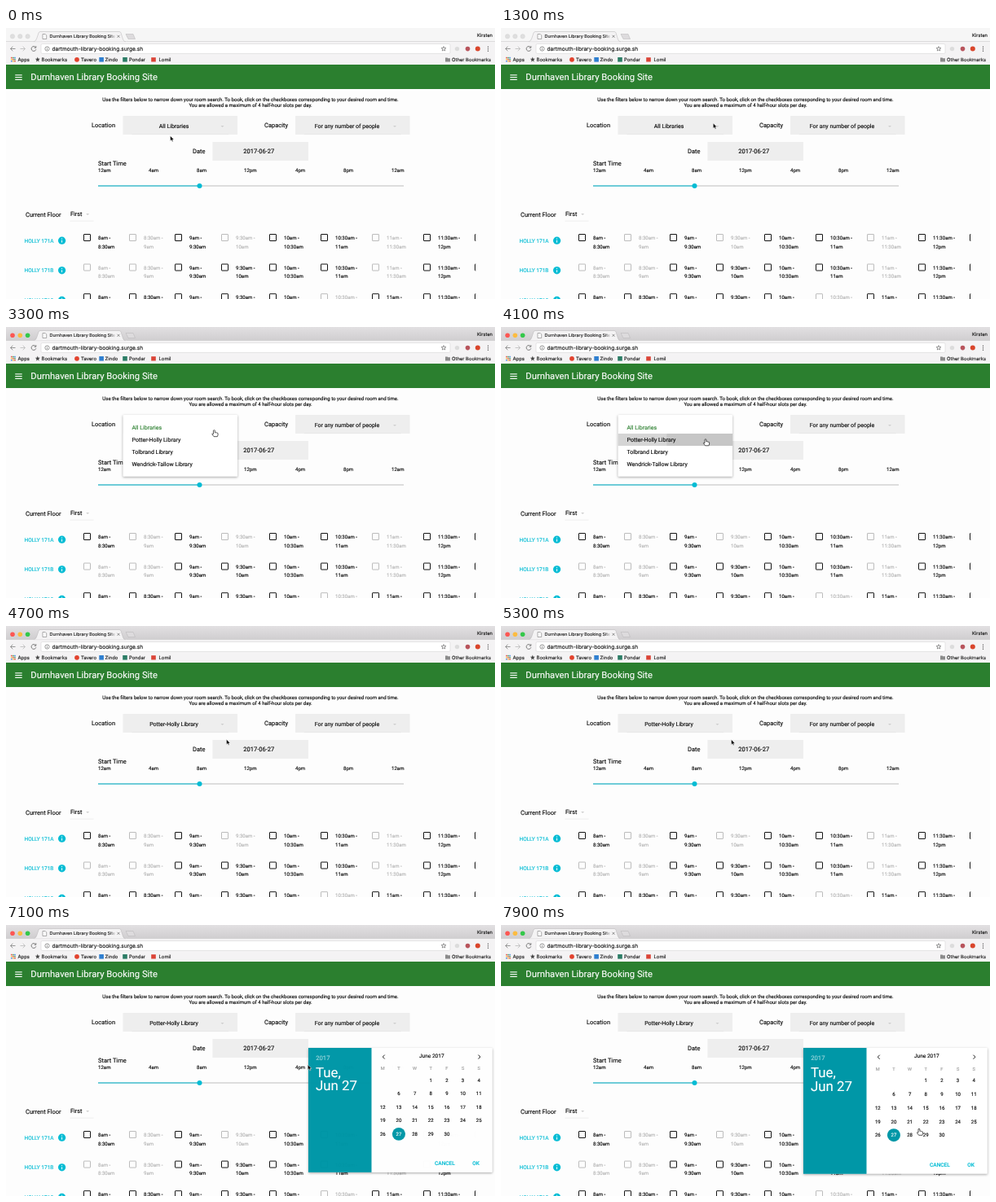
An HTML page for the animation above (8 s loop, 600x333 px).

```html
<!DOCTYPE html>
<html lang="en">
<head>
<meta charset="utf-8">
<title>Library booking</title>
<style>
  html, body { margin: 0; width: 100%; height: 100%; overflow: hidden; background: #fdfdfd; }
  svg { display: block; width: 600px; height: 333px; }
  text {
    font-family: Roboto, sans-serif; color: #080808; fill: currentColor;
    stroke: currentColor; stroke-width: .14px; text-rendering: geometricPrecision; white-space: pre;
  }
  .ui text { font-family: Inter, sans-serif; color: #1a1a1a; }
  .shadow { filter: drop-shadow(0 1px 1.6px rgba(0, 0, 0, .34)); }
</style>
</head>
<body>
<svg id="stage" viewBox="0 0 600 333" xmlns="http://www.w3.org/2000/svg">
  <defs>
    <linearGradient id="bar" x2="0" y2="1"><stop stop-color="#e2e0e2"/><stop offset="1" stop-color="#cfcdcf"/></linearGradient>
    <linearGradient id="fade"><stop stop-color="#f4f3f4" stop-opacity="0"/><stop offset="1" stop-color="#f4f3f4"/></linearGradient>
    <clipPath id="tabClip"><rect x="53" y="4" width="81" height="13"/></clipPath>
    <clipPath id="gridClip"><rect y="240" width="576.3" height="93"/></clipPath>
    <clipPath id="rowClip"><rect x="143.5" y="131" width="140.5" height="15"/></clipPath>
  </defs>
  <g id="page"></g>
  <g id="chrome" class="ui"></g>
  <g id="menu"></g>
  <g id="picker"></g>
  <g id="cursor" stroke-linejoin="round">
    <path id="arrow" d="M0 0V6.4L1.5 5.1L2.5 7.3L3.6 6.8L2.7 4.7H4.6Z" fill="#000" stroke="#fff" stroke-width=".5"/>
    <path id="hand" d="M-1 .5Q0-.6.9.5V3.1Q1.7 2.6 2.2 3.2Q3 2.8 3.5 3.5Q4.5 3.2 4.6 4.3V6.2L3.9 8H-.4L-2.6 5Q-2.5 3.9-1 4.8Z" fill="#fff" stroke="#222" stroke-width=".75"/>
  </g>
</svg>
<script>
const NS = 'http://www.w3.org/2000/svg';
const $ = id => document.getElementById(id);
const CYAN = '#00bcd4', TEAL = '#0097a7', GREEN = '#2b7f2f', TOOLBAR = '#f4f3f4';

function add(parent, tag, attrs, content) {
  const el = document.createElementNS(NS, tag);
  for (const k in attrs) el.setAttribute(k, attrs[k]);
  if (content !== undefined) el.textContent = content;
  return parent.appendChild(el);
}
const rect = (g, x, y, width, height, fill, more) => add(g, 'rect', { x, y, width, height, fill, ...more });
const disc = (g, cx, cy, r, fill, more) => add(g, 'circle', { cx, cy, r, fill, ...more });
const line = (g, d, stroke, w = 1, more) => add(g, 'path', { d, stroke, 'stroke-width': w, fill: 'none', ...more });
const shape = (g, d, fill) => add(g, 'path', { d, fill });
const text = (g, x, y, size, str, color, more) =>
  add(g, 'text', { x, y, 'font-size': size, ...(color && { style: `color:${color}` }), ...more }, str);
const MID = { 'text-anchor': 'middle' };

function star(g, cx, cy, r, fill, stroke) {
  const pts = Array.from({ length: 10 }, (_, i) => {
    const a = i * Math.PI / 5, q = i % 2 ? r * .42 : r;
    return [cx + q * Math.sin(a), cy - q * Math.cos(a)].join();
  });
  add(g, 'polygon', { points: pts.join(' '), fill, stroke, 'stroke-width': .6 });
}

function buildChrome() {
  const g = $('chrome');
  rect(g, 0, 0, 600, 17, 'url(#bar)');
  ['#fc5753', '#fdbc40', '#34c84a'].forEach((c, i) => disc(g, 8 + 9.3 * i, 10.3, 2.8, c));
  const idle = add(g, 'g', { id: 'idle' });
  rect(idle, 0, 0, 600, 17, '#f6f6f6');
  for (let i = 0; i < 3; i++) disc(idle, 8 + 9.3 * i, 10.3, 2.7, '#dedede', { stroke: '#d2d2d2', 'stroke-width': .4 });

  rect(g, 0, 16.5, 600, 28.5, TOOLBAR);
  line(g, 'M0 16.5H600', '#c2c0c2', .5);
  add(g, 'path', { d: 'M34 17Q37 16 38 12L40 6Q40.6 4.5 42 4.5H139Q140.5 4.5 141 6L143.5 14Q144.5 17 147 17Z',
    fill: TOOLBAR, stroke: '#b4b2b4', 'stroke-width': .5 });
  rect(g, 34, 16.8, 114, 1, TOOLBAR);
  add(g, 'path', { d: 'M45 7.5H48.2L49.7 9V13.5H45Z', fill: '#fff', stroke: '#777', 'stroke-width': .6 });
  text(g, 53.6, 12.4, 5.4, 'Durnhaven Library Booking Site', null, { 'clip-path': 'url(#tabClip)' });
  rect(g, 127, 5, 7.5, 11, 'url(#fade)');
  line(g, 'M136.5 8.8L139.5 11.8M139.5 8.8L136.5 11.8', '#666', .7);
  add(g, 'path', { d: 'M147 7.5H156L158.5 13.5H150Z', fill: '#dddbdd', stroke: '#b4b2b4', 'stroke-width': .5 });
  text(g, 597, 11, 5.75, 'Kirsten', null, { 'text-anchor': 'end' });

  line(g, 'M11.5 25.5H5.5M8.3 22.7L5.5 25.5L8.3 28.3', '#8c8c8c', .9);
  line(g, 'M17.5 25.5H23.5M20.7 22.7L23.5 25.5L20.7 28.3', '#c0c0c0', .9);
  line(g, 'M36.3 23.7A2.9 2.9 0 1 0 36.8 26.3M36.8 22.2V24.3H34.7', '#707070', .9);
  rect(g, 43, 19.5, 502, 12, '#fff', { rx: 1.5, stroke: '#d0ced0', 'stroke-width': .5 });
  disc(g, 50.5, 25.5, 2.6, 'none', { stroke: '#555', 'stroke-width': .6 });
  line(g, 'M50.5 25.2V27M50.5 23.8V24.5', '#555', .6);
  text(g, 56.5, 27.7, 6.6, 'dartmouth-library-booking.surge.sh');
  star(g, 537, 25.6, 3, 'none', '#555');
  disc(g, 553.5, 25.6, 2.7, '#dcdcdc');
  disc(g, 566.5, 25.6, 2.8, '#b8545c');
  disc(g, 578.8, 25.6, 3, '#d9452b');
  for (const y of [23.2, 25.7, 28.2]) disc(g, 591.5, y, .7, '#555');

  const dots = ['#e2453c', '#3b9d50', '#3f7fe8', '#efb52d'];
  for (let i = 0; i < 9; i++) rect(g, 6 + i % 3 * 2.1, 35.8 + (i / 3 | 0) * 2.1, 1.5, 1.5, dots[i % 4]);
  star(g, 38.8, 38.8, 3.2, '#444', 'none');
  disc(g, 87, 38.8, 2.9, '#e2432e');
  rect(g, 114.3, 36, 5.6, 5.6, '#2f7fd0');
  rect(g, 143.2, 36, 5.6, 5.6, '#2c7d66');
  rect(g, 178.2, 36.2, 5.6, 5.3, '#db4437');
  [[14.5, 'Apps'], [43.5, 'Bookmarks'], [92, 'Tavero'], [121.5, 'Zindo'], [151, 'Pondar'], [187.5, 'Lomil']]
    .forEach(([x, s]) => text(g, x, 40.8, 5.95, s));
  shape(g, 'M539 36.5H541.5L542.3 37.3H545V41.5H539Z', '#8b8b8b');
  text(g, 547, 40.8, 5.85, 'Other Bookmarks');
}

const field = (g, x, y, w) => rect(g, x, y, w, 23, '#eeeeee');
const caret = (g, x, y) => shape(g, `M${x - 2} ${y - 1}h4l-2 2z`, '#cfcfcf');

function checkCell(g, x, y, label, on) {
  rect(g, x - 17.5, y - 6.5, 8, 8, 'none', { rx: .4, stroke: on ? '#151515' : '#bcbcbc', 'stroke-width': 1 });
  label.split('|').forEach((s, i) => text(g, x, y + 10.5 * i, 6.09, s, on ? null : '#b4b4b4'));
}

function buildPage() {
  const g = $('page');
  rect(g, 0, 45, 600, 288, '#fdfdfd');
  rect(g, 0, 45, 600, 30, GREEN);
  for (const y of [57.3, 60.1, 62.9]) rect(g, 11.2, y, 8.5, 1.1, '#fff');
  text(g, 30.3, 64, 11.25, 'Durnhaven Library Booking Site', '#fff');

  text(g, 300, 90.3, 6.094, 'Use the filters below to narrow down your room search. To book, click on the checkboxes corresponding to your desired room and time.', null, MID);
  text(g, 300, 97.3, 6.094, 'You are allowed a maximum of 4 half-hour slots per day.', null, MID);
  text(g, 105, 122, 7.5, 'Location');
  text(g, 317, 122, 7.5, 'Capacity');
  text(g, 229, 154, 7.5, 'Date');
  field(g, 143.5, 108, 140.5);
  field(g, 355, 108, 140.5);
  field(g, 253.5, 140, 117.5);
  line(g, 'M154.5 130.6H273M366 130.6H484.5', '#e0e0e0', .5);
  caret(g, 265.5, 121);
  caret(g, 477, 121);
  text(g, 206, 123.3, 7.03, 'All Libraries', null, { ...MID, id: 'place' });
  text(g, 418.5, 123.3, 7.03, 'For any number of people', null, MID);
  text(g, 310.3, 154, 7.5, '2017-06-27', null, MID);

  text(g, 113, 169.2, 7.5, 'Start Time');
  [113, 175, 234, 292, 355, 414, 473].forEach((x, i) =>
    text(g, x, 177, 6.094, (i * 4 % 12 || 12) + (i % 6 < 3 ? 'am' : 'pm')));
  line(g, 'M113 194H488', '#bdbdbd', 1.1);
  line(g, 'M113 194H237.5', CYAN, 1.1);
  disc(g, 237.5, 194, 3, CYAN);

  text(g, 24, 232, 7.5, 'Current Floor');
  text(g, 79, 231.4, 7.3, 'First');
  caret(g, 100.2, 229);
  line(g, 'M78.5 237.2H107.5', '#dedede', .5);

  const grid = add(g, 'g', { 'clip-path': 'url(#gridClip)' });
  const xs = [113, 169, 225, 282, 341, 404, 467, 530, 593];
  const clock = n => (n >> 1) + (n % 2 ? ':30' : '') + (n < 24 ? 'am' : 'pm');
  ['101011011', '001111011', '111110111'].forEach((states, r) => {
    const y = 260 + 36.6 * r;
    text(grid, 22.5, y + 3.5, 6.5, 'HOLLY 171' + 'ABC'[r], CYAN);
    disc(grid, 68.6, y + 1.2, 4.6, CYAN);
    line(grid, `M68.6 ${y + .7}v3M68.6 ${y - 1.6}v1.1`, '#fff', 1);
    xs.forEach((x, i) => checkCell(grid, x, y, `${clock(16 + i)} -|${clock(17 + i)}`, states[i] === '1'));
  });
}

function buildMenu() {
  const g = $('menu');
  rect(g, 143.5, 108, 140.5, 75.8, '#fff', { rx: .8, class: 'shadow' });
  rect(g, 143.5, 131, 140.5, 15, '#d5d5d5', { id: 'hover' });
  const clip = add(g, 'g', { 'clip-path': 'url(#rowClip)' });
  disc(clip, 251, 138.5, 48, '#000', { id: 'ripple' });
  ['All Libraries', 'Potter-Holly Library', 'Tolbrand Library', 'Wendrick-Tallow Library']
    .forEach((s, i) => text(g, 154.5, 125.6 + 15 * i, 7.03, s, i ? null : GREEN));
}

function buildPicker() {
  const g = $('picker');
  rect(g, 371, 151, 225.8, 154.8, '#fff', { rx: .8, class: 'shadow' });
  rect(g, 371, 151, 77.5, 154.8, TEAL);
  text(g, 380.2, 166.3, 7.7, '2017', '#9fd8de');
  text(g, 380, 187.2, 16.875, 'Tue,', '#fff');
  text(g, 380, 204, 16.875, 'Jun 27', '#fff');
  line(g, 'M464.7 159.7L462.3 162.2L464.7 164.7M579.5 159.7L581.9 162.2L579.5 164.7', '#222', 1);
  text(g, 522.3, 163.3, 6.56, 'June 2017', null, MID);
  const colX = c => 462.3 + 19.65 * c;
  [...'MTWTFSS'].forEach((s, c) => text(g, colX(c), 178.8, 5.6, s, '#9b9b9b', MID));
  for (let d = 1; d <= 30; d++) {
    const slot = d + 2, x = colX(slot % 7), y = 193.2 + 16.8 * (slot / 7 | 0);
    if (d === 27) disc(g, x, y - 2.2, 8, TEAL);
    // The 5th stays blank
    if (d !== 5) text(g, x, y, 6.09, d, d === 27 ? '#fff' : null, MID);
  }
  text(g, 526, 296.6, 6.56, 'CANCEL', CYAN, { 'font-weight': 500 });
  text(g, 572.3, 296.6, 6.56, 'OK', CYAN, { 'font-weight': 500 });
}

buildPage();
buildChrome();
buildMenu();
buildPicker();

const LOOP = 8000, STEP = 100;
const PATH = [
  [0, 201.5, 132.4], [200, 203, 132.4], [1100, 261, 116.5], [1300, 260.3, 116.9], [2200, 257.5, 121.5],
  [3000, 257.5, 121.5], [3800, 251, 137.8], [4400, 251, 137.8], [4900, 281, 140], [5300, 282.5, 139.5],
  [6200, 335, 152.5], [6900, 335.5, 152.5], [7600, 511, 249], [7900, 513, 250.3], [8000, 513, 250.3]
];
const clamp = v => Math.min(1, Math.max(0, v));
const smooth = p => p * p * (3 - 2 * p);
const span = (t, from, ms) => clamp((t - from) / ms);
const easeOut = p => 1 - (1 - p) ** 4;

function pointAt(t) {
  const i = PATH.findIndex(k => k[0] > t);
  const [t0, x0, y0] = PATH[i - 1], [t1, x1, y1] = PATH[i];
  const p = smooth((t - t0) / (t1 - t0));
  return [x0 + (x1 - x0) * p, y0 + (y1 - y0) * p];
}

// Panels unfold downwards from their top edge
function unfold(el, top, amount) {
  el.setAttribute('transform', `translate(0 ${top}) scale(1 ${amount}) translate(0 ${-top})`);
  el.setAttribute('opacity', amount);
  el.setAttribute('visibility', amount > .01 ? 'visible' : 'hidden');
}
const show = (el, on) => el.setAttribute('display', on ? 'inline' : 'none');

function draw(now) {
  const t = Math.floor(now % LOOP / STEP) * STEP;
  const [x, y] = pointAt(t);

  // The window gains focus with the first click
  show($('idle'), t < 1500);
  unfold($('menu'), 108, easeOut(span(t, 2800, 450)) * (1 - easeOut(span(t, 4300, 350))));
  unfold($('picker'), 151, easeOut(span(t, 6800, 450)));
  $('place').textContent = t < 4400 ? 'All Libraries' : 'Potter-Holly Library';

  show($('hover'), y > 131);
  $('ripple').setAttribute('r', 48 + 70 * span(t, 4100, 300));
  $('ripple').setAttribute('opacity', t < 4100 ? 0 : .07 * (1 - span(t, 4200, 400)));

  const hand = (t >= 2900 && t < 4600) || t >= 7200;
  show($('arrow'), !hand);
  show($('hand'), hand);
  $('cursor').setAttribute('transform', `translate(${x} ${y})`);
}

const start = performance.now();
(function tick() {
  draw(performance.now() - start);
  requestAnimationFrame(tick);
})();
</script>
</body>
</html>
```
